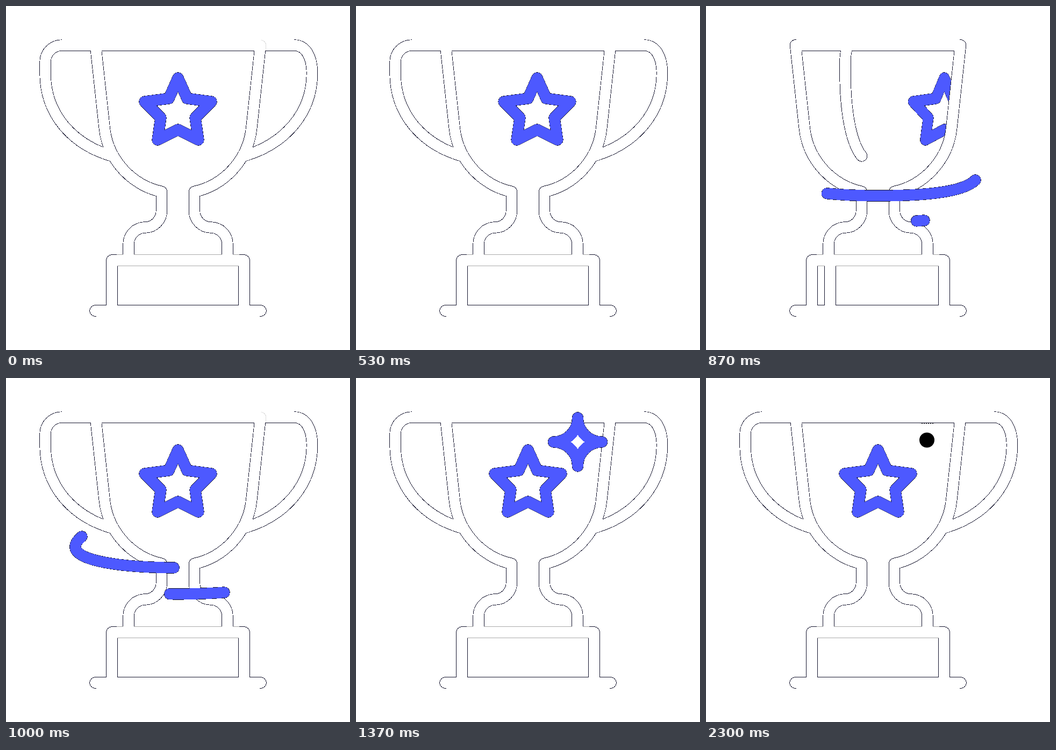
Recreate the animation shown at these times as an HTML page. Size 640 px wide and 640 px high, loop 2.5 s.

```html
<!DOCTYPE html>
<html>
<head>
<meta charset="utf-8">
<style>
  html, body { margin: 0; width: 100%; height: 100%; overflow: hidden; background: #fff }
  svg { display: block }
  path { stroke-linecap: round; stroke-linejoin: round; shape-rendering: crispEdges }
  .fixed { vector-effect: non-scaling-stroke }
  .edge { stroke: #15152e; stroke-width: 21.4 }
  .white { stroke: #fff; stroke-width: 19.7 }
  .blue { stroke: #4d59ff; stroke-width: 20.4 }
</style>
</head>
<body>
<svg width="640" height="640" viewBox="0 0 640 640" fill="none">
  <defs>
    <path id="bowl" d="M166.5 73L183 225C189 288 236 334 289.5 345.5H350.5C404 334 451 288 457 225L473.5 73Z"/>
    <clipPath id="inside"><use href="#bowl"/></clipPath>
    <clipPath id="outside">
      <path clip-rule="evenodd" d="M0 0H640V640H0ZM166.5 73L183 225C189 288 236 334 289.5 345.5H350.5C404 334 451 288 457 225L473.5 73Z"/>
    </clipPath>
    <path id="side" d="M166.5 73L183 225C189 288 236 334 289.5 345.5V381A31 31 0 0 1 258 412A31 31 0 0 0 228 443V470"/>
    <g id="cup">
      <g clip-path="url(#outside)">
        <path id="back" class="fixed" d="M472 73H536C558 73 569.5 95 569.5 125C569.5 200 518 257 443 279"/>
      </g>
      <path id="front" class="fixed" d="M168 73H104A31 31 0 0 0 73 104V125C73 200 122 257 197 279"/>
      <use href="#side"/>
      <use href="#side" transform="matrix(-1 0 0 1 640 0)"/>
      <path d="M166.5 73H473.5M166 567H474M197 567V473H443V567"/>
      <path id="rib" d="M320 473V567"/>
    </g>
    <path id="star" d="M320 134L337 172L382 178L352 208L358 249L320 230L282 249L288 208L258 178L303 172Z"/>
    <path id="spark" fill="#fff" d="M0-45C0-20 20 0 45 0C20 0 0 20 0 45C0 20-20 0-45 0C-20 0 0-20 0-45Z"/>
    <path id="sweepA" pathLength="1" d="M501 324C475 350 385 353 320 353C210 353 90 338 141 295"/>
    <path id="sweepB" pathLength="1" d="M406 399Q300 406 215 396"/>
  </defs>

  <g clip-path="url(#inside)">
    <g class="star"><use href="#star" class="edge"/><use href="#star" class="blue"/></g>
    <g class="star"><use href="#star" class="edge"/><use href="#star" class="blue"/></g>
  </g>
  <use href="#cup" class="edge"/>
  <path d="M206 473H434" stroke="#aaa" stroke-width="21.4" style="stroke-linecap:butt"/>
  <use href="#cup" class="white"/>
  <rect id="topGap" y="61" height="3" fill="#fff"/>
  <rect x="168" y="576" width="304" height="3" fill="#fff"/>
  <path id="glint" d="M475 63.5A9 9 0 0 1 483.5 73V83" stroke="#ddd"/>

  <use href="#sweepA" class="edge"/><use href="#sweepA" class="blue"/>
  <use href="#sweepB" class="edge"/><use href="#sweepB" class="blue"/>
  <g id="sparkle"><use href="#spark" class="edge"/><use href="#spark" class="blue"/></g>
  <g id="dot">
    <circle cx="411" cy="115.5" r="14" fill="#000"/>
    <path d="M401 84H424" stroke="#000" stroke-dasharray="2 2" style="stroke-linecap:butt"/>
  </g>
</svg>
<script>
const $ = id => document.getElementById(id);
const stars = document.querySelectorAll('.star');
const ramp = (t, a, b) => Math.min(1, Math.max(0, (t - a) / (b - a)));
const show = (el, on) => el.style.display = on ? '' : 'none';
const squeeze = (el, k, x = 320) =>
  el.setAttribute('transform', `translate(${x}) scale(${k} 1) translate(-320)`);

function trim(el, tail, head) {
  show(el, head > tail);
  el.setAttribute('stroke-dasharray', `${head - tail} 2`);
  el.setAttribute('stroke-dashoffset', -tail);
}

// Three half turns; each one brings the trophy back to the same pose.
const halfTurns = t =>
  1.055 * ramp(t, 270, 530) + 1.365 * ramp(t, 530, 870) + 0.58 * ramp(t, 870, 1000);

function draw(t) {
  const turns = halfTurns(t);
  const u = t >= 1000 ? 0 : turns % 1;
  const k = Math.max(-1, Math.min(1, 1.05 * Math.cos(Math.PI * u))) || 0.001;
  squeeze($('front'), k);
  squeeze($('back'), k);
  $('rib').setAttribute('transform',
    `translate(${-123 * Math.cos(Math.PI * u ** 1.65)})`);

  const shift = 288 * u + 37 * u ** 4;
  stars.forEach((star, i) => {
    const x = shift - 325 * i;
    squeeze(star, Math.max(0.2, 1 - 0.18 * (x / 200) ** 2), 320 + x);
  });

  const half = Math.max(152, 216 * Math.abs(k));
  $('topGap').setAttribute('x', 320 - half);
  $('topGap').setAttribute('width', 2 * half);
  show($('glint'), t < 270 || (t >= 1000 && t < 1330));

  trim($('sweepA'), ramp(t, 880, 1137), ramp(t, 740, 932));
  trim($('sweepB'), ramp(t, 1005, 1295), ramp(t, 850, 1135));

  const size = ramp(t, 1300, 1370) * (1 - ramp(t, 2070, 2300) ** 2);
  const held = t >= 1370 && t < 2100 ? 1 : size;
  show($('sparkle'), held > 0);
  $('sparkle').setAttribute('transform', `translate(412.5 119) scale(${held})`);
  show($('dot'), t >= 2300);
}

const start = performance.now();
function tick() {
  draw((performance.now() - start) % 2500);
  requestAnimationFrame(tick);
}
tick();
</script>
</body>
</html>
```
